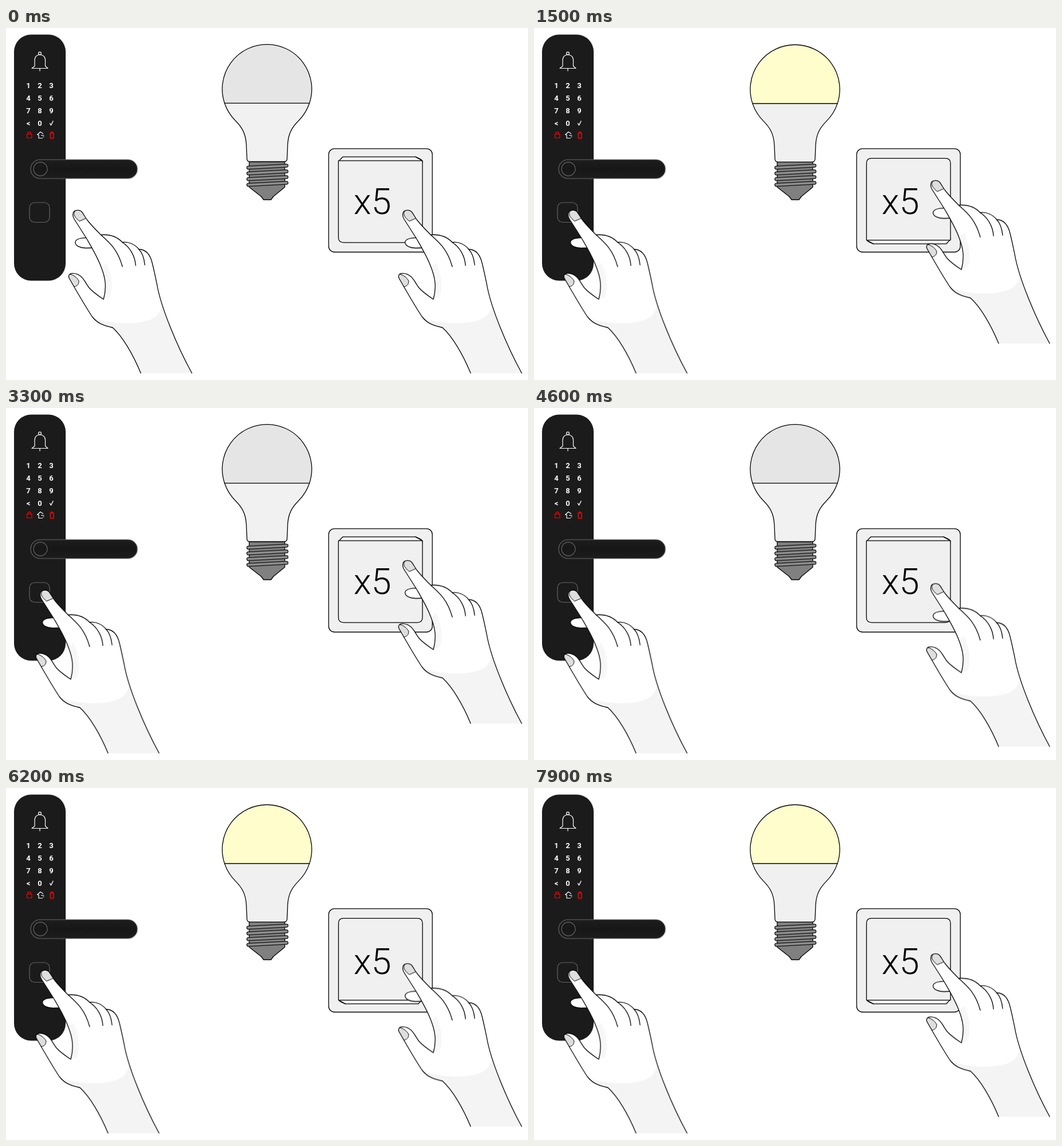
An HTML page for the animation above (8000 ms loop, 910 by 615 pixels).

```html
<!DOCTYPE html>
<html lang="en">
<head>
<meta charset="utf-8">
<title>Press the switch five times</title>
<style>
  html, body { margin: 0; width: 100%; height: 100%; overflow: hidden; background: #fff; }
  svg { display: block; width: 100%; height: 100%; }

  .ink { stroke: #000; stroke-width: 1.3; stroke-linecap: round; stroke-linejoin: round; }
  .line { fill: none; }
  .flat { stroke: none; }
  .keys { font: 700 13px Roboto, sans-serif; fill: #fff; text-anchor: middle; }
  .count { font: 300 63px Roboto, sans-serif; }
  .icon { fill: none; stroke-width: 1.2; stroke-linejoin: round; stroke-linecap: round; }

  .reach, .tap, .on, .off { animation: 8s infinite; }
  .reach { animation-name: reach; }
  .tap { animation-name: tap; }
  .on, .off { animation-timing-function: step-end; }
  .on { animation-name: on; }
  .off { animation-name: off; }

  /* Movement advances ten times a second */
  @keyframes reach {
    0% { transform: translateX(0); animation-timing-function: step-end; }
    5% { transform: translateX(0); animation-timing-function: steps(10); }
    17.5%, 100% { transform: translateX(-57.2px); }
  }
  @keyframes tap {
    0% { transform: translateY(0); animation-timing-function: step-end; }
    5%, 30%, 55%, 80% { transform: translateY(0); animation-timing-function: steps(10); }
    17.5%, 42.5%, 67.5% { transform: translateY(-57.6px); animation-timing-function: steps(10); }
    92.5% { transform: translateY(-57.6px); animation-timing-function: steps(6); }
    100% { transform: translateY(-23.04px); }
  }
  @keyframes on {
    0%, 30%, 55%, 80% { visibility: hidden; }
    17.5%, 42.5%, 67.5%, 92.5%, 100% { visibility: visible; }
  }
  @keyframes off {
    0%, 30%, 55%, 80% { visibility: visible; }
    17.5%, 42.5%, 67.5%, 92.5%, 100% { visibility: hidden; }
  }
</style>
</head>
<body>
<svg viewBox="0 0 910 615">
  <defs>
    <linearGradient id="bar" x2="0" y2="1">
      <stop offset="0" stop-color="#1d1d1d"/>
      <stop offset=".5" stop-color="#171717"/>
      <stop offset="1" stop-color="#1d1d1d"/>
    </linearGradient>

    <path id="dome" d="M381 131.3A78 78 0 1 1 529 131.3Z"/>
    <path id="neck" d="M381 131.3A78 78 0 0 0 400 162C411 173 418 184 419 204L420 228Q420 233.5 425 233.5H485Q490 233.5 490 228L491 204C492 184 499 173 510 162A78 78 0 0 0 529 131.3Z"/>
    <path id="rib" d="M422.5 244L489 240.5"/>
    <g id="thread">
      <use href="#rib" stroke="#111" stroke-width="6.6"/>
      <use href="#rib" stroke="#8c8c8c" stroke-width="4.2"/>
    </g>

    <g id="rocker">
      <path d="M579.5 236Q579.5 233 581.5 231L587 225.2H714L724 230Q726 232 726 235Z"/>
      <path d="M579.5 231.8H726V366Q726 374.8 717 374.8H589Q579.5 374.8 579.5 366Z"/>
      <path d="M714 225.2L725.5 231.8L721 228.3Z" fill="#000"/>
    </g>

    <path id="skin" d="M235 603C221 569 203 539 186 523.5C170 520 159 516 150 504C138 486 122 458 110 437C108 432 111 428.5 117 428.7C134 430 137 444 145 454C152 462 161 468 170 474C176 452 173 436 166 418C159 399 148 381 140 367L119 334C116 329 115.5 323 119 320C123 317.5 129 318 132 321C136 326 138 331 142 336C149 345 158 354 165.5 361.5C183 360 195 366 203 374.5C214 373 225 378 231.5 386.5C245 387 252 398 255 411C259 427 261 438 263 447C270 489 299 557 324 603"/>

    <g id="hand" class="ink" fill="#fff">
      <path d="M150 366.5C136 366 121 367.5 120.7 374.5C121 381 130 384.5 139 384.5L158 384Z"/>
      <use href="#skin" class="flat"/>
      <path class="flat" fill="#f4f4f4" d="M152 506C178 518 234 519 255 508C268 501 272 489 272 480C284 520 305 568 324 603H235C221 569 203 539 186 523.5C170 520 159 516 152 506Z"/>
      <path class="flat" fill="#f7f7f7" d="M166 418L175 410C185 431 187 455 181 470L170 474C176 452 173 436 166 418Z"/>
      <path class="flat" fill="#dedede" d="M119 327C117 322 121 319 126 319.5C132 320 135 327 139.5 332.5L128 337.5C124 334 120.5 331 119 327Z"/>
      <path class="flat" fill="#dedede" d="M109.7 436L111 430C117 429 124 435 127 442C127 447 125 451 118.5 452Z"/>
      <g class="line">
        <use href="#skin"/>
        <path d="M165.5 361.5C182 376 195 388 203 417M203 374.5C216 383 225 398 226 415M231.5 386.5C238 393 241 404 242 414"/>
        <path stroke-width="1" d="M139.5 332.5L128 337.5C124 334 120.5 331 119 327Q117.5 322 121 319.5M111 430C117 431 124 436 127 442C127 447 125 451 118.5 452"/>
      </g>
    </g>
  </defs>

  <g id="lock">
    <rect x="14" y="11.5" width="90" height="430" rx="30" fill="#1b1b1b"/>
    <g class="icon" stroke="#fff">
      <circle cx="59" cy="44.3" r="2.4"/>
      <path d="M45 70.5L50 66.5V56C50 50 54 46.7 59 46.7S68.5 50 68.5 56V66.5L73 70.5ZM59 71V75"/>
      <path d="M76.5 166.5L78.5 169.8L82 162.7" stroke-width="1.4"/>
      <path d="M64.5 184.5L60 181.5L54.5 186.5H57V192.5H63.5M61.5 187.5H66M64.5 190H66"/>
    </g>
    <g class="icon" stroke="#f00">
      <path d="M36.5 185.5H45V192H36.5ZM38 185.5V184Q38 181.7 40.7 181.7T43.5 184V185.5"/>
      <path d="M77 183.5H83V192.5H77ZM78.5 181.7H81.5" stroke-width="1.5"/>
    </g>
    <g class="keys">
      <text y="105"><tspan x="39">1</tspan><tspan x="59">2</tspan><tspan x="79">3</tspan></text>
      <text y="127"><tspan x="39">4</tspan><tspan x="59">5</tspan><tspan x="79">6</tspan></text>
      <text y="149"><tspan x="39">7</tspan><tspan x="59">8</tspan><tspan x="79">9</tspan></text>
      <text y="171"><tspan x="39">&lt;</tspan><tspan x="59">0</tspan></text>
    </g>
    <g fill="none" stroke="#666" stroke-width="1.2">
      <rect x="43" y="230" width="186" height="33" rx="16.5" fill="url(#bar)"/>
      <circle cx="60" cy="246.3" r="12"/>
      <rect x="41" y="305" width="35" height="34.5" rx="9"/>
    </g>
  </g>

  <g id="bulb" class="ink">
    <path d="M424 233.5H486V278L466 294.5L462 300H449L445 294.5L424 278Z" fill="#808080"/>
    <use href="#thread"/>
    <use href="#thread" y="10"/>
    <use href="#thread" y="20"/>
    <use href="#thread" y="30"/>
    <g class="off">
      <use href="#neck" fill="#f1f1f1"/>
      <use href="#dome" fill="#e5e5e5"/>
    </g>
    <g class="on">
      <use href="#neck" y=".6" fill="#f0f0f0"/>
      <use href="#dome" y=".6" fill="#fffdcc"/>
    </g>
  </g>

  <g id="switch" class="ink" fill="#f0f0f0">
    <rect x="562.5" y="210.8" width="180.7" height="180.7" rx="10"/>
    <use class="off" href="#rocker"/>
    <g class="on"><use href="#rocker" transform="rotate(180 652.8 301.2)"/></g>
  </g>
  <text class="count" x="606" y="325">x5</text>

  <g class="reach"><use href="#hand"/></g>
  <g class="tap"><use href="#hand" x="575"/></g>
</svg>
</body>
</html>
```
